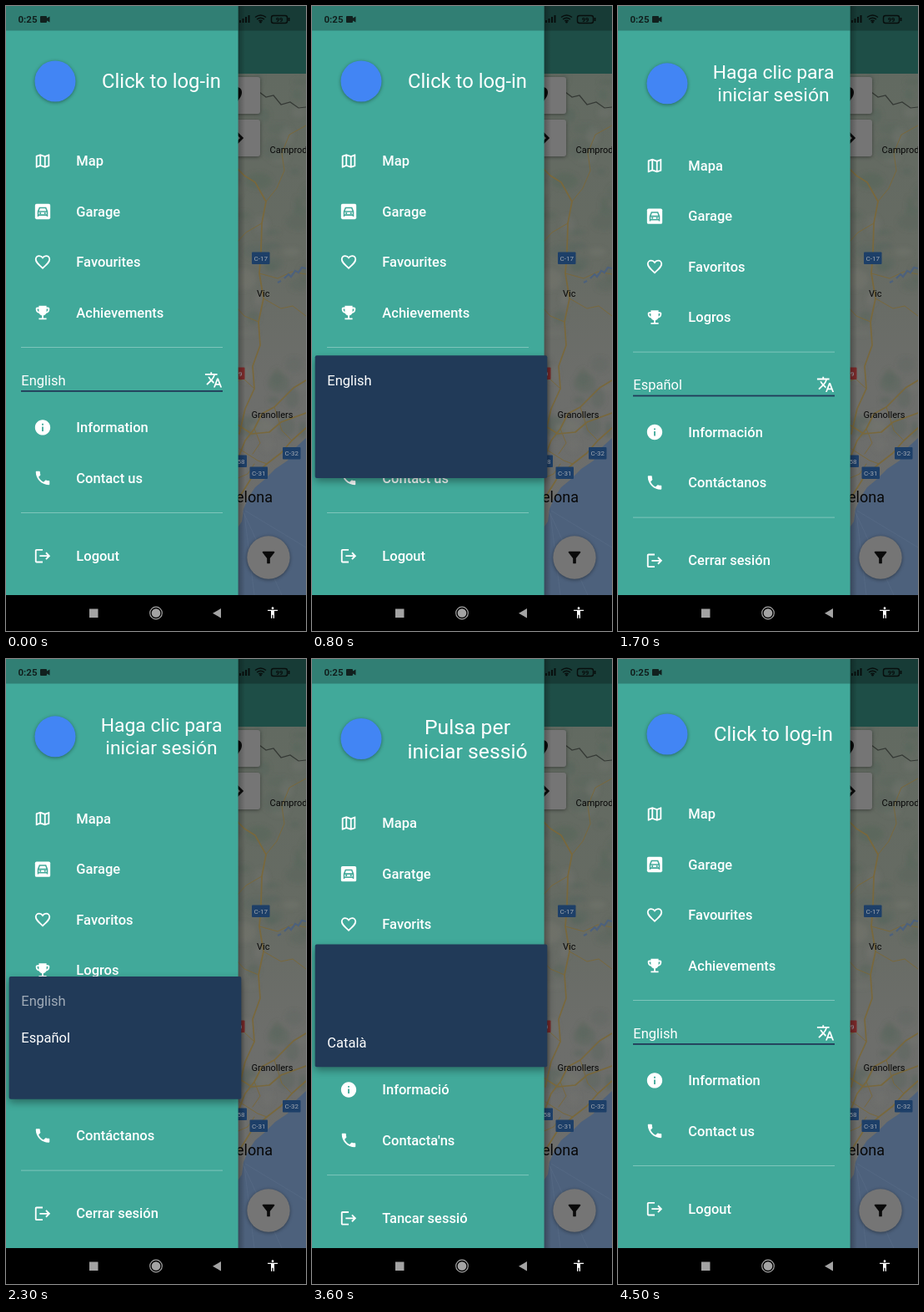
An HTML page that plays this animation: 360 px wide and 748 px high, repeating every 5.2 s.

```html
<!DOCTYPE html>
<html lang="en">
<head>
<meta charset="utf-8">
<title>Language drawer</title>
<style>
  html, body { margin: 0; width: 100%; height: 100%; overflow: hidden; background: #000; }
  svg { display: block; width: 100vw; height: 100vh; }
  text { font-family: Roboto, "Noto Sans", sans-serif; white-space: pre; }
  .item { font-size: 16.5px; font-weight: 500; fill: #fff; }
  .option { font-size: 16.5px; fill: #fff; }
  .title { fill: #fff; text-anchor: middle; }
  .sign { font-size: 8px; fill: #a3a9b2; text-anchor: middle; }
  .town { fill: #080808; }
  .road { fill: none; stroke: #79683c; stroke-linejoin: round; stroke-linecap: round; }
  .menu { filter: drop-shadow(0 4px 5px rgba(0, 0, 0, .36)); }
  .card { filter: drop-shadow(0 1px 2px rgba(0, 0, 0, .4)); }
</style>
</head>
<body>
<svg id="stage" viewBox="0 0 360 748" preserveAspectRatio="none">
  <defs>
    <clipPath id="mapClip"><rect x="270" y="81" width="90" height="624"/></clipPath>
    <filter id="soft" x="-50%" y="-50%" width="200%" height="200%"><feGaussianBlur stdDeviation="2.5"/></filter>
    <linearGradient id="land" x1="0" y1="0" x2="0" y2="1">
      <stop offset="0" stop-color="#626a61"/><stop offset=".35" stop-color="#666b63"/>
      <stop offset=".6" stop-color="#6d6e6b"/><stop offset="1" stop-color="#6c6d6c"/>
    </linearGradient>
    <linearGradient id="edge"><stop offset="0" stop-opacity=".28"/><stop offset="1" stop-opacity="0"/></linearGradient>
  </defs>

  <g clip-path="url(#mapClip)">
    <rect x="270" y="81" width="90" height="624" fill="url(#land)"/>
    <g id="hills" filter="url(#soft)"></g>
    <path d="M360 517L347 529 338 544 323 554 310 567 299 576 291 588 285 602 283 617 276 627V705H360Z" fill="#4d617c"/>
    <g stroke="#5f728b" stroke-width=".7" fill="none" opacity=".6">
      <path d="M284 604L331 705M287 604L360 648M286 607L298 705"/>
    </g>
    <g class="road" stroke-width="1.7">
      <path d="M276 193L286 203 299 211 312 234 307 260 306 294 304 320 309 350 303 378 305 406 296 431 298 458 287 482 280 512"/>
      <path d="M360 448L345 457 333 469 322 480 307 488 298 506 287 520 276 548"/>
      <path d="M360 505L343 520 330 535 313 548 295 564 285 580 276 594"/>
      <path d="M276 500L295 512 316 510 330 498 360 487"/>
    </g>
    <g class="road" stroke-width="1">
      <path d="M312 234L325 218 334 197 331 176 340 154 360 143M307 260L288 271 276 284"/>
      <path d="M304 320L326 326 343 318 360 321M309 350L330 362 344 359 360 371"/>
      <path d="M303 378L286 371 276 360M298 458L285 446 276 450M322 480L331 508 343 520"/>
      <path d="M296 536L305 523 298 506M280 530L302 544 313 548M276 566L290 560 298 548"/>
    </g>
    <path d="M304 103L312 109 321 107 330 118 341 115 351 122 360 121" fill="none" stroke="#343834" stroke-width="1.2"/>
    <path d="M334 326l5-5 3 3 5-7 4 2 4-6 5 1M326 331l4-2" fill="none" stroke="#4d617c" stroke-width="2.2"/>
    <g id="labels"></g>
    <g class="card" fill="#757575">
      <rect x="255" y="85" width="50" height="44" rx="3"/>
      <rect x="255" y="136" width="50" height="44" rx="3"/>
      <circle cx="315" cy="660" r="25.7"/>
    </g>
    <path d="M276 97c8 0 9 8 4 14l-4 6z" fill="#0a0a0a"/>
    <path d="M277 152l6 6-6 6" fill="none" stroke="#0a0a0a" stroke-width="3"/>
  </g>

  <rect x="270" width="90" height="81" fill="#1e4e47"/>
  <rect x="270" width="90" height="29.5" fill="#173b36"/>
  <rect x="278" y="0" width="9" height="705" fill="url(#edge)"/>
  <g fill="#080e0d">
    <path d="M280 20v-3h2v3zM283.5 20v-5h2v5zM287 20v-7h2v7zM290.5 20v-9h2v9z"/>
    <circle cx="305.500" cy="19.300" r="1.300"/>
  </g>
  <g fill="none" stroke="#080e0d" stroke-width="1.4">
    <path d="M299 13.500q6.500-5 13 0M301 16q4.500-3.500 9 0M303.200 18q2.300-1.700 4.600 0"/>
    <rect x="318.500" y="11.500" width="19" height="9" rx="2.500"/>
    <path d="M339.500 14v4" stroke-width="2"/>
  </g>
  <text x="328" y="19" font-size="7.500" font-weight="700" text-anchor="middle" fill="#080e0d">99</text>

  <rect width="278.6" height="705" fill="#41a99a"/>
  <rect width="278.6" height="29.5" fill="#000" opacity=".25"/>
  <text x="14.500" y="20" font-size="11.500" font-weight="700" fill="#11201e">0:25</text>
  <path d="M42 12h6q1 0 1 1v1.500l3.500-2v7l-3.500-2V19q0 1-1 1h-6q-1 0-1-1v-6q0-1 1-1z" fill="#11201e"/>
  <g id="header"></g>
  <g id="body"></g>
  <g id="menu" class="menu"></g>

  <rect y="705" width="360" height="43"/>
  <rect x="100" y="721.500" width="10.500" height="10.500" fill="#a3a3a3"/>
  <circle cx="180" cy="726.500" r="5.300" fill="#a3a3a3"/>
  <circle cx="180" cy="726.500" r="7.300" fill="none" stroke="#a3a3a3" stroke-width="1.200"/>
  <path d="M258 721v11.500l-10-5.750z" fill="#a3a3a3"/>
  <g id="navIcon"></g>
</svg>
<script>
const LOOP = 5200, STEP = 100;
const OPEN_TIME = 300, FADE = 75, ROW = 44, PAD = 7.33;
const NAMES = ["English", "Español", "Català"];

const LANGS = [
  { shift: 0, avatar: 90, size: 23.83, title: [[98.3, "Click to log-in"]],
    items: ["Map", "Garage", "Favourites", "Achievements", "Information", "Contact us", "Logout"] },
  { shift: 5.6, avatar: 92.8, size: 22.92, title: [[87.3, "Haga clic para"], [114.2, "iniciar sesión"]],
    items: ["Mapa", "Garage", "Favoritos", "Logros", "Información", "Contáctanos", "Cerrar sesión"] },
  { shift: 11.1, avatar: 95.5, size: 24.75, title: [[89.5, "Pulsa per"], [118.5, "iniciar sessió"]],
    items: ["Mapa", "Garatge", "Favorits", "Trofeus", "Informació", "Contacta'ns", "Tancar sessió"] }
];

// Each session opens the menu on the current language and closes it on the next one.
const SESSIONS = [
  { open: 650, close: 1375 },
  { open: 2088, close: 2875 },
  { open: 3450, close: 4425 }
];

const ROWS = [185.3, 245.8, 306.2, 366.8, 504.2, 564.7, 658];
const fill = d => `<path d="${d}"/>`;
const ICONS = {
  map: fill("M20.5 3l-.16.03L15 5.1 9 3 3.36 4.9c-.21.07-.36.25-.36.48V20.5c0 .28.22.5.5.5l.16-.03L9 18.9l6 2.1 5.64-1.9c.21-.07.36-.25.36-.48V3.5c0-.28-.22-.5-.5-.5zM10 5.47l4 1.4v11.66l-4-1.4V5.47zm-5 .99l3-1.01v11.7l-3 1.16V6.46zm14 11.08l-3 1.01V6.86l3-1.16v11.84z"),
  garage: `<rect x="2" y="2" width="20" height="20" rx="2"/>
    <path d="M6 18.500V12l2-5h8l2 5v6.500M6 12h12M6 16.500h12" fill="none" stroke="#41a99a" stroke-width="1.700"/>
    <circle cx="9" cy="14.300" r="1.200" fill="#41a99a"/><circle cx="15" cy="14.300" r="1.200" fill="#41a99a"/>`,
  heart: `<path d="M12 20C6 14.600 3 12 3 8.500 3 6 5 4 7.500 4 9.400 4 11 5 12 6.500 13 5 14.600 4 16.500 4 19 4 21 6 21 8.500 21 12 18 14.600 12 20Z" fill="none" stroke="#fff" stroke-width="2"/>`,
  trophy: fill("M19 5h-2V3H7v2H5c-1.1 0-2 .9-2 2v1c0 2.55 1.92 4.63 4.39 4.94.63 1.5 1.98 2.63 3.61 2.96V19H7v2h10v-2h-4v-3.1c1.63-.33 2.98-1.46 3.61-2.96C19.08 12.63 21 10.55 21 8V7c0-1.1-.9-2-2-2zM5 8V7h2v3.82C5.84 10.4 5 9.3 5 8zm14 0c0 1.3-.84 2.4-2 2.82V7h2v1z"),
  info: fill("M12 2C6.48 2 2 6.48 2 12s4.48 10 10 10 10-4.48 10-10S17.52 2 12 2zm1 15h-2v-6h2v6zm0-8h-2V7h2v2z"),
  phone: fill("M6.62 10.79c1.44 2.83 3.76 5.14 6.59 6.59l2.2-2.2c.27-.27.67-.36 1.02-.24 1.12.37 2.33.57 3.57.57.55 0 1 .45 1 1V20c0 .55-.45 1-1 1-9.39 0-17-7.61-17-17 0-.55.45-1 1-1h3.5c.55 0 1 .45 1 1 0 1.25.2 2.45.57 3.57.11.35.03.74-.25 1.02l-2.2 2.2z"),
  logout: fill("M17 7l-1.41 1.41L18.17 11H8v2h10.17l-2.58 2.58L17 17l5-5zM4 5h8V3H4c-1.1 0-2 .9-2 2v14c0 1.1.9 2 2 2h8v-2H4V5z"),
  translate: fill("M12.87 15.07l-2.54-2.51.03-.03c1.74-1.94 2.98-4.17 3.71-6.53H17V4h-7V2H8v2H1v1.99h11.17C11.5 7.92 10.44 9.75 9 11.35 8.07 10.32 7.3 9.19 6.69 8h-2c.73 1.63 1.73 3.17 2.98 4.56l-5.09 5.02L4 19l5-5 3.11 3.11.76-2.04zM18.5 10h-2L12 22h2l1.12-3h4.75L21 22h2l-4.5-12zm-2.62 7l1.62-4.33L19.12 17h-3.24z"),
  filter: fill("M4.25 5.61C6.27 8.2 10 13 10 13v6c0 .55.45 1 1 1h2c.55 0 1-.45 1-1v-6s3.72-4.8 5.74-7.39A1 1 0 0 0 18.95 4H5.04c-.83 0-1.3.95-.79 1.61z"),
  person: fill("M12 2c1.1 0 2 .9 2 2s-.9 2-2 2-2-.9-2-2 .9-2 2-2zm9 7h-6v13h-2v-6h-2v6H9V9H3V7h18v2z")
};
const ROW_ICONS = ["map", "garage", "heart", "trophy", "info", "phone", "logout"];

const $ = id => document.getElementById(id);
const clamp = v => Math.min(1, Math.max(0, v));
const text = (x, y, s, attrs) => `<text x="${x}" y="${y}" ${attrs}>${s}</text>`;
const icon = (name, x, y, size = 22, color = "#fff") =>
  `<g transform="translate(${x - size / 2} ${y - size / 2}) scale(${size / 24})" fill="${color}">${ICONS[name]}</g>`;
const divider = y => `<rect x="18" y="${y}" width="242" height="1" fill="#fff" opacity=".32"/>`;

function buildMap() {
  let seed = 11;
  const rand = () => (seed = seed * 16807 % 2147483647) / 2147483647;
  let hills = "";
  for (let i = 0; i < 46; i++) {
    const y = 85 + rand() * 440;
    const color = rand() < .65 ? "#55645a" : "#74766f";
    hills += `<ellipse cx="${275 + rand() * 90}" cy="${y}" rx="${4 + rand() * 13}" ry="${3 + rand() * 10}" fill="${color}" opacity="${.25 + rand() * .3}"/>`;
  }
  $("hills").innerHTML = hills;

  const sign = (x, y, w, s, color = "#1d3f68") =>
    `<rect x="${x}" y="${y}" width="${w}" height="14.500" rx="1" fill="${color}"/>` +
    text(x + w / 2, y + 10.3, s, 'class="sign"');
  const town = (x, y, s, size, attrs = "") => text(x, y, s, `class="town" font-size="${size}" ${attrs}`);
  $("labels").innerHTML =
    sign(295, 294.5, 21.5, "C-17") + sign(270, 432.5, 16.5, "AP-9".slice(-1).padStart(4), "#7d2a2a") +
    sign(332, 528, 21.5, "C-32") + sign(275, 537.5, 14, "58") + sign(292.5, 551.5, 21.5, "C-31") +
    town(316.5, 176, "Camprodon", 11) + town(301, 348, "Vic", 11) +
    town(294.5, 493, "Granollers", 11) + town(320, 593.5, "Barcelona", 18, 'text-anchor="end"');
}

function drawerHeader(lang) {
  return `<circle class="card" cx="59" cy="${lang.avatar}" r="24.500" fill="#4285f4"/>` +
    lang.title.map(([y, s]) => text(186.5, y, s, `class="title" font-size="${lang.size}"`)).join("");
}

function drawerBody(lang, index) {
  const rows = ROWS.map((y, i) =>
    icon(ROW_ICONS[i], 44, y + .2) + text(84.3, y + 5.8, lang.items[i], 'class="item"')).join("");
  return `<g transform="translate(0 ${lang.shift})">${rows}${divider(408)}${divider(606)}` +
    text(18.3, 453.5, NAMES[index], 'class="option"') + icon("translate", 249, 447.3) +
    '<rect x="18" y="460" width="242" height="1.800" fill="#213a58"/></g>';
}

function drawMenu(time, session, selected) {
  const age = time - session.open;
  const opacity = clamp(age / FADE) * (1 - clamp((time - session.close) / FADE));
  $("menu").setAttribute("opacity", opacity);
  if (!opacity) return "";

  const progress = clamp(age / OPEN_TIME);
  const grow = clamp((progress - .25) / .25);
  const height = 3 * ROW + 2 * PAD;
  const center = 447.7 + LANGS[selected].shift;
  const top = center - ROW / 2 - PAD - selected * ROW;
  const start = PAD + selected * ROW;
  const from = start * (1 - grow);
  const to = start + ROW + (height - start - ROW) * grow;
  const unit = .5 / (NAMES.length + 1.5);
  const options = NAMES.map((name, i) => {
    const shown = i === selected ? 1 : clamp((progress - .5 - (i + 1) * unit) / (1.5 * unit));
    return text(18.3, center + 5.8 + (i - selected) * ROW, name, `class="option" opacity="${shown}"`);
  }).join("");
  return `<rect x="3.700" y="${top + from}" width="278.600" height="${to - from}" rx="2" fill="#213a58"/>${options}`;
}

let shownLang = -1, shownTime = -1;

function render(ms) {
  const time = Math.floor(ms % LOOP / STEP) * STEP;
  if (time === shownTime) return;
  shownTime = time;
  const closed = SESSIONS.filter(s => time >= s.close).length;
  const index = closed % LANGS.length;
  if (index !== shownLang) {
    shownLang = index;
    $("header").innerHTML = drawerHeader(LANGS[index]);
    $("body").innerHTML = drawerBody(LANGS[index], index);
  }
  // A closing menu keeps its place until it has faded out.
  const current = SESSIONS.findIndex(s => time < s.close + FADE);
  $("menu").innerHTML = current < 0 ? "" : drawMenu(time, SESSIONS[current], current);
}

buildMap();
$("labels").parentNode.insertAdjacentHTML("beforeend", icon("filter", 315, 660, 22, "#0a0a0a"));
$("navIcon").innerHTML = icon("person", 320, 726, 16);

const begin = performance.now();
(function tick() {
  render(performance.now() - begin);
  requestAnimationFrame(tick);
})();
</script>
</body>
</html>
```
